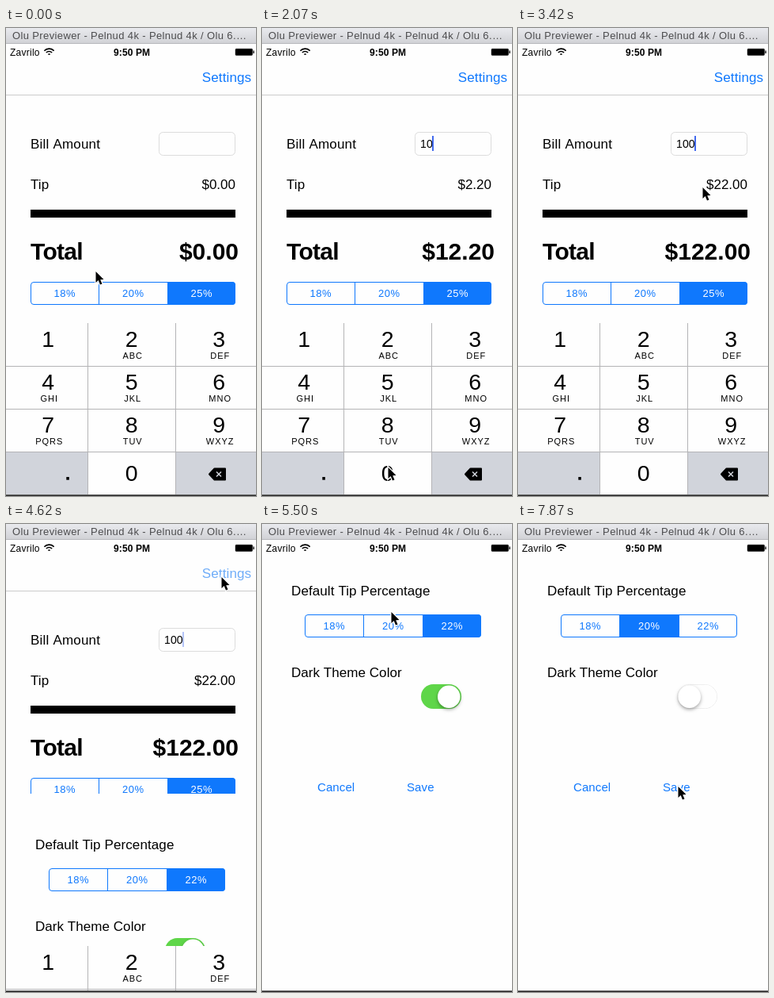
An HTML page with a canvas that plays this animation: 316 px wide and 590 px high, repeating every 8000 ms.

```html
<!DOCTYPE html>
<html lang="en">
<head>
<meta charset="utf-8">
<title>Tip calculator</title>
<style>
  html, body { margin: 0; width: 100%; height: 100%; overflow: hidden; background: #fefefe; }
  canvas { display: block; width: 316px; height: 590px; }
</style>
</head>
<body>
<canvas id="stage"></canvas>
<script>
const W = 316, H = 590, LOOP = 8000, STEP = 148.6;
const BLUE = '#0f78fd', PAGE = '#fefefe', KEY_GREY = '#d1d4db', LINE = '#b4b4b6';
const FONT = '"Liberation Sans", Arial, sans-serif';
const canvas = document.getElementById('stage');
const ctx = canvas.getContext('2d');
const dpr = window.devicePixelRatio || 1;
canvas.width = W * dpr;
canvas.height = H * dpr;

// The screen updates once per STEP; all times below count those steps.
const BILL = '100', TYPED = [7, 13, 16];
const TAP_SETTINGS = 29, SLIDE = 30, KEYS_OUT = 29.55, SLIDE_LENGTH = 2.2;
const PICK = 41, SWITCH = 48.5;

// Pointer moves: start, length, and the place reached.
const REST = [113, 306];
const MOVES = [
  [0, 3, 61, 398],
  [7, 4, 159, 553],
  [16, 4, 229, 326],
  [20, 3, 233, 200],
  [23, 4, 272, 66],
  [32, 4, 163, 110],
  [37, 1, 159, 125],
  [42, 4, 223, 222],
  [50, 3, 202, 330]
];

function ease(k, from, length) {
  const p = Math.min(1, Math.max(0, (k - from) / length));
  return p * p * (3 - 2 * p);
}

function pointerAt(k) {
  let [x, y] = REST;
  for (const [from, length, toX, toY] of MOVES) {
    const f = ease(k, from, length);
    x += (toX - x) * f;
    y += (toY - y) * f;
  }
  return [Math.round(x), Math.round(y)];
}

function text(str, x, y, size, { color = '#000', align = 'left', weight = 'normal', gap = 0 } = {}) {
  ctx.font = `${weight} ${size}px ${FONT}`;
  ctx.letterSpacing = gap + 'px';
  ctx.fillStyle = color;
  const w = ctx.measureText(str).width - gap;
  ctx.fillText(str, align === 'right' ? x - w : align === 'center' ? x - w / 2 : x, y);
  return w;
}

function rect(x, y, w, h, color) {
  ctx.fillStyle = color;
  ctx.fillRect(x, y, w, h);
}

function pill(x, y, w, h, r) {
  ctx.beginPath();
  ctx.roundRect(x, y, w, h, r);
}

function poly(points) {
  ctx.beginPath();
  points.forEach(([x, y]) => ctx.lineTo(x, y));
  ctx.closePath();
}

function paint(fill, stroke, width) {
  ctx.lineWidth = width;
  ctx.strokeStyle = stroke;
  ctx.stroke();
  ctx.fillStyle = fill;
  ctx.fill();
}

function segments(x, y, w, labels, picked) {
  const h = 29, edge = i => Math.round(x + w * i / 3);
  ctx.save();
  pill(x, y, w, h, 4);
  ctx.clip();
  rect(edge(picked), y, edge(picked + 1) - edge(picked), h, BLUE);
  for (const i of [1, 2]) rect(edge(i), y, 1, h, BLUE);
  ctx.restore();
  ctx.strokeStyle = BLUE;
  ctx.lineWidth = 1;
  pill(x + 0.5, y + 0.5, w - 1, h - 1, 3.5);
  ctx.stroke();
  labels.forEach((label, i) => text(label, (edge(i) + edge(i + 1)) / 2, y + 19, 13,
    { align: 'center', gap: 0.6, color: i === picked ? '#fff' : BLUE }));
}

function titleBar() {
  const g = ctx.createLinearGradient(0, 0, 0, 20);
  g.addColorStop(0, '#e9eaee');
  g.addColorStop(1, '#d0d1d5');
  rect(0, 0, W, 20, g);
  rect(0, 19, W, 1, '#b7b8bc');
  text('Olu Previewer - Pelnud 4k - Pelnud 4k / Olu 6.…', 8, 14, 13, { color: '#4c4c4e', gap: 0.37 });
}

function statusBar() {
  text('Zavrilo', 5, 34.5, 12, { gap: 0.25 });
  text('9:50 PM', 159, 34.5, 12, { align: 'center', weight: 'bold', gap: 0.1 });
  ctx.strokeStyle = '#000';
  ctx.lineWidth = 1.6;
  for (const r of [1.5, 5, 8.4]) {
    ctx.beginPath();
    ctx.arc(54.5, 34.5, r, -Math.PI * 0.76, -Math.PI * 0.24);
    ctx.stroke();
  }
  pill(290, 26.2, 21.5, 8.2, 1);
  paint('#000', '#8a8a8a', 1);
  rect(312.4, 28.5, 1.3, 3.5, '#000');
}

function mainPage(k) {
  const bill = BILL.slice(0, TYPED.filter(at => k >= at).length);
  const tip = bill * 0.22;
  const money = v => '$' + v.toFixed(2);
  text('Settings', 310, 68, 17, { align: 'right', color: k >= TAP_SETTINGS ? '#6fadf8' : BLUE, gap: 0.1 });
  rect(0, 84, W, 1, '#cbcbcb');
  text('Bill Amount', 31, 152, 17, { gap: 0.2 });
  ctx.strokeStyle = '#dcdcdc';
  ctx.lineWidth = 1;
  pill(193.5, 131.5, 96, 29, 5);
  ctx.stroke();
  const w = text(bill, 200, 151, 14, { gap: 0.1 });
  if (k >= 2) {
    ctx.globalAlpha = 1 - ease(k, TAP_SETTINGS, 3.5);
    rect(200 + Math.max(0, Math.floor(w)), 136, 2, 19, '#4169ee');
    ctx.globalAlpha = 1;
  }
  text('Tip', 31, 203, 17, { gap: 0.1 });
  text(money(tip), 290, 203, 17, { align: 'right' });
  rect(31, 229, 259, 10, '#000');
  text('Total', 31, 292, 30, { weight: 'bold', gap: -0.7 });
  text(money(+bill + tip), 294, 292, 30, { align: 'right', weight: 'bold' });
  segments(31, 320, 259, ['18%', '20%', '25%'], 2);
}

function toggle(on) {
  pill(201.5, 202.5, 50, 30, 15);
  paint(PAGE, '#e0e0e0', 1);
  ctx.globalAlpha = on;
  pill(201, 202, 51, 31, 15.5);
  ctx.fillStyle = '#5fd649';
  ctx.fill();
  ctx.globalAlpha = 1;
  ctx.save();
  ctx.shadowColor = 'rgba(0,0,0,0.35)';
  ctx.shadowBlur = 4 * dpr;
  ctx.shadowOffsetY = 2 * dpr;
  const stretch = on > 0 && on < 1 ? 5 : 0;
  pill(202.5 + (19.5 - stretch) * on, 203.5, 28.5 + stretch, 28.5, 14.25);
  ctx.fillStyle = '#fff';
  ctx.fill();
  ctx.restore();
}

function settingsPage(k) {
  const dy = Math.round(563 * (1 - ease(k, SLIDE, SLIDE_LENGTH)));
  ctx.save();
  ctx.translate(0, dy);
  rect(0, 20, W, H, PAGE);
  text('Default Tip Percentage', 37, 90, 17, { gap: 0.1 });
  segments(54, 114, 223, ['18%', '20%', '22%'], k < PICK ? 2 : 1);
  text('Dark Theme Color', 37, 193, 17, { gap: 0.05 });
  toggle(1 - ease(k, SWITCH, 2));
  text('Cancel', 70, 337, 15, { color: BLUE, gap: 0.1 });
  text('Save', 183, 337, 15, { color: BLUE, gap: 0.1 });
  ctx.restore();
}

function deleteIcon() {
  ctx.lineJoin = 'round';
  poly([[257, 562.5], [263.5, 555.5], [277, 555.5], [277, 569.5], [263.5, 569.5]]);
  paint('#000', '#000', 2);
  ctx.lineJoin = 'miter';
  ctx.strokeStyle = KEY_GREY;
  ctx.lineWidth = 1.5;
  ctx.beginPath();
  for (const s of [-3, 3]) {
    ctx.moveTo(269 - s, 559.5);
    ctx.lineTo(269 + s, 565.5);
  }
  ctx.stroke();
}

function keypad(k) {
  const letters = ['', 'ABC', 'DEF', 'GHI', 'JKL', 'MNO', 'PQRS', 'TUV', 'WXYZ'];
  const mid = [53.3, 158.7, 269.2];
  const pressed = BILL[TYPED.indexOf(k + 1)];
  ctx.save();
  ctx.translate(0, Math.round(219 * ease(k, KEYS_OUT, SLIDE_LENGTH)));
  rect(0, 372, W, 218, PAGE);
  if (pressed === '1') rect(0, 372, 103, 54, KEY_GREY);
  if (pressed === '0') rect(104, 535, 110, 55, KEY_GREY);
  rect(0, 535, 103, 55, KEY_GREY);
  rect(215, 535, 101, 55, KEY_GREY);
  for (const y of [426, 480, 534]) rect(0, y, W, 1, LINE);
  for (const x of [103, 214]) rect(x, 372, 1, 218, LINE);
  letters.forEach((word, i) => {
    const x = mid[i % 3], y = 402 + 54 * Math.floor(i / 3);
    text(String(i + 1), x, y - 0.5, 28.5, { align: 'center' });
    text(word, x + 1, y + 15, 11, { align: 'center', gap: 1 });
  });
  text('0', mid[1], 571, 28.5, { align: 'center' });
  rect(76.3, 566, 3.5, 3.7, '#000');
  deleteIcon();
  ctx.restore();
}

function pointer(k) {
  const [x, y] = pointerAt(k);
  ctx.save();
  ctx.translate(x + 0.5, y + 1);
  poly([[0, 0], [0, 14], [3.2, 11.1], [5.5, 16.4], [8, 15.4], [5.7, 10.2], [10, 10]]);
  paint('#000', '#fff', 2.6);
  ctx.restore();
}

function draw(now) {
  const k = Math.floor((now % LOOP + 12) / STEP);
  ctx.setTransform(dpr, 0, 0, dpr, 0, 0);
  rect(0, 0, W, H, PAGE);
  mainPage(k);
  settingsPage(k);
  keypad(k);
  titleBar();
  statusBar();
  rect(0, 588, W, 1, '#6e6e6e');
  rect(0, 589, W, 1, '#2a2a2a');
  pointer(k);
}

const start = performance.now();
function tick() {
  draw(performance.now() - start);
  requestAnimationFrame(tick);
}
tick();
</script>
</body>
</html>
```
